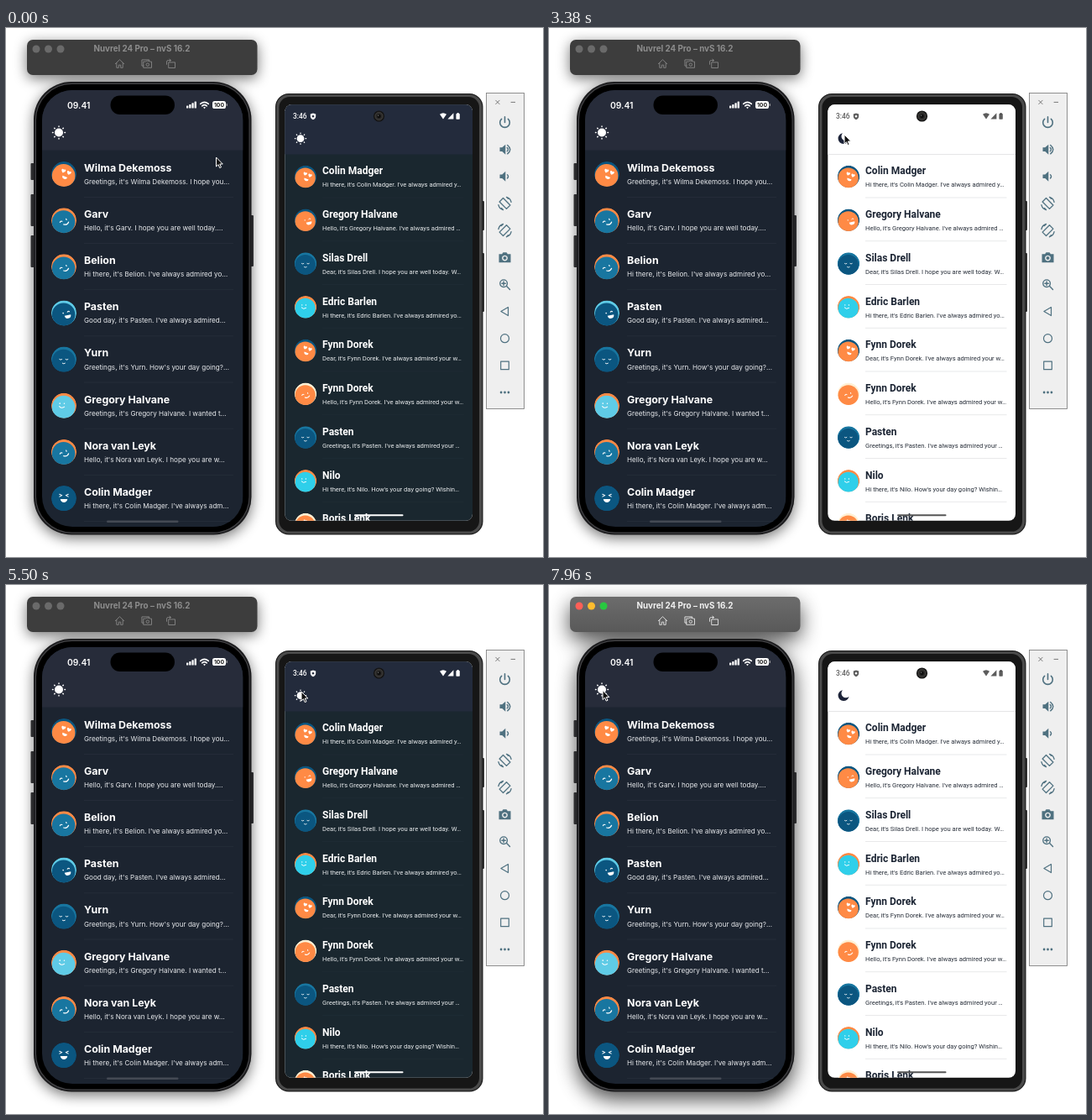
Write an HTML page that moves like this. It is 640 px wide and 630 px high and loops after 8000 ms.

```html
<!DOCTYPE html>
<html lang="en">
<head>
<meta charset="utf-8">
<title>Theme switch</title>
<style>
html, body { margin: 0; width: 100%; height: 100%; overflow: hidden; background: #fff; }
svg { display: block; width: 640px; height: 630px; }
.ios { font-family: Inter, sans-serif; }
.droid { font-family: Roboto, sans-serif; }
</style>
</head>
<body>
<svg id="stage" viewBox="0 0 640 630"></svg>
<script>
const LOOP = 8000;
const ORANGE = "#ff8a45", NAVY = "#0b5680", BLUE = "#1876a0", CYAN = "#5fcbe6", AQUA = "#2fcfea", CREAM = "#fff0d4";

// name, greeting, rest, rim, face, mood, tilt
const iosRows = [
  ["Wilma Dekemoss", "Greetings", "I hope you…", NAVY, ORANGE, "heart", 20],
  ["Garv", "Hello", "I hope you are well today.…", ORANGE, BLUE, "wink", -25],
  ["Belion", "Hi there", "I've always admired yo…", ORANGE, BLUE, "wink", -25],
  ["Pasten", "Good day", "I've always admired…", CYAN, NAVY, "open", -12],
  ["Yurn", "Greetings", "How's your day going?…", BLUE, NAVY, "sleep", 0],
  ["Gregory Halvane", "Greetings", "I wanted t…", ORANGE, CYAN, "smile", 10],
  ["Nora van Leyk", "Hello", "I hope you are w…", ORANGE, BLUE, "wink", -25],
  ["Colin Madger", "Hi there", "I've always adm…", NAVY, NAVY, "laugh", 0]
];
const droidRows = [
  ["Colin Madger", "Hi there", "I've always admired y…", NAVY, ORANGE, "heart", 20],
  ["Gregory Halvane", "Hello", "I've always admired …", NAVY, ORANGE, "open", -12],
  ["Silas Drell", "Dear", "I hope you are well today. W…", BLUE, NAVY, "sleep", 0],
  ["Edric Barlen", "Hi there", "I've always admired yo…", ORANGE, AQUA, "smile", 10],
  ["Fynn Dorek", "Dear", "I've always admired your w…", NAVY, ORANGE, "heart", 20],
  ["Fynn Dorek", "Hello", "I've always admired your w…", CREAM, ORANGE, "wink", -20],
  ["Pasten", "Greetings", "I've always admired your …", BLUE, NAVY, "sleep", 0],
  ["Nilo", "Hi there", "How's your day going? Wishin…", ORANGE, AQUA, "smile", 10],
  ["Boris Lenk", "Hello", "I hope you are well today.…", CREAM, ORANGE, "heart", 20]
];

const rect = (x, y, w, h, r, fill, more = "") =>
  `<rect x="${x}" y="${y}" width="${w}" height="${h}" rx="${r}" fill="${fill}" ${more}/>`;
const dot = (x, y, r, fill, more = "") => `<circle cx="${x}" cy="${y}" r="${r}" fill="${fill}" ${more}/>`;
const shape = (d, fill, more = "") => `<path d="${d}" fill="${fill}" ${more}/>`;
const line = (d, color, w = 1.2, more = "") =>
  `<path d="${d}" fill="none" stroke="${color}" stroke-width="${w}" stroke-linecap="round" stroke-linejoin="round" ${more}/>`;
const text = (x, y, size, weight, fill, s, more = "") =>
  `<text x="${x}" y="${y}" font-size="${size}" font-weight="${weight}" fill="${fill}" ${more}>${s}</text>`;
const at = (x, y, inner, extra = "") => `<g transform="translate(${x} ${y}) ${extra}">${inner}</g>`;

const heart = (x, y) => at(x, y, shape("M0,2.8C-5,-.6 -2.6,-3.9 0,-1.6C2.6,-3.9 5,-.6 0,2.8z", "#fff"));
const moods = {
  heart: heart(-2, -4) + heart(6, -4) + shape("M-1,2.6H6A3.5,3.5 0 0 1 -1,2.6z", "#fff"),
  wink: line("M-6,.2q1.6,-1.7 3.2,0M3.6,-.6v1.4", "#fff", 1.3) + line("M-2.6,4.8Q1,8.2 4.8,4.8", "#fff", 1.4),
  open: dot(-1, 0, .9, "#fff") + line("M5,-.4q1.4,-1.3 2.8,0", "#fff") + shape("M0,4H8.8A4.4,4.4 0 0 1 0,4z", "#fff"),
  sleep: line("M-6,0q1.6,1.5 3.2,0M2.4,0q1.6,1.5 3.2,0M-2,5.4q1.8,1.5 3.6,0", "#fff", 1.1),
  smile: dot(-6, -2, .9, "#fff") + dot(0, -3, .9, "#fff") + line("M-6,2Q-3,5.2 1,1.4", "#fff", 1.2),
  laugh: line("M-6,-5.6l3.4,1.7l-3.4,1.7M6,-5.6l-3.4,1.7l3.4,1.7", "#fff", 1.2) + shape("M-4.8,1H4.8A4.8,4.8 0 0 1 -4.8,1z", "#fff")
};

function avatar(x, y, scale, [, , , rim, face, mood, tilt]) {
  return at(x, y, `<g clip-path="url(#disc)">${dot(0, 0, 15, rim)}${dot(-.4, 1.9, 13.8, face)}</g>` +
    `<g transform="rotate(${tilt}) scale(.87)">${moods[mood]}</g>`, `scale(${scale})`);
}

function list(rows, o) {
  return rows.map((row, i) => {
    const y = o.top + i * o.step;
    const body = `${row[1]}, it's ${row[0]}. ${row[2]}`;
    return avatar(o.ax, y + o.ay, o.ar / 15, row) +
      text(o.x, y + o.base, o.big, 700, o.name, row[0]) +
      text(o.x, y + o.sub, o.small, 400, o.body, body) +
      rect(o.x, y + o.rule, o.w, .8, 0, o.line);
  }).join("");
}

function sun(x, y, r) {
  let rays = "";
  for (let i = 0; i < 8; i++) {
    const a = i * Math.PI / 4, c = Math.cos(a), s = Math.sin(a);
    rays += `M${c * r * 1.38},${s * r * 1.38}L${c * r * 1.5},${s * r * 1.5}`;
  }
  return at(x, y, dot(0, 0, r, "#fff") + line(rays, "#fff", r * .3));
}
const moon = (x, y) => at(x, y, shape("M-1,-6.5A6.5,6.5 0 1 0 6.5,1A5.3,5.3 0 0 1 -1,-6.5z", "#1c2338"));
const wifi = (x, y, s, c) => at(x, y,
  line("M-4.8,-2.2Q0,-6.4 4.8,-2.2M-2.8,.2Q0,-2.2 2.8,.2", c, 1.6) + shape("M-1.5,2Q0,.8 1.5,2L0,3.6z", c), `scale(${s})`);

function titleBar(active) {
  const ink = active ? "#f2f2f2" : "#8d8d8d", icon = active ? "#e6e6e6" : "#868686";
  const lights = active ? ["#ff5f57", "#febc2e", "#28c840"] : ["#6a6a6a", "#6a6a6a", "#6a6a6a"];
  const fill = active ? "url(#bar)" : "#3d3d3d";
  return rect(25, 14, 274.5, 42, 7, fill) +
    lights.map((c, i) => dot(36 + i * 14.5, 25, 4.5, c)).join("") +
    text(162, 28.3, 9.8, 700, ink, "Nuvrel 24 Pro – nvS 16.2", 'text-anchor="middle"') +
    at(135.5, 42.5, line("M-5.2,.2L0,-4.8L5.2,.2M-3.7,-1V4.8H-1.2V1.6H1.2V4.8H3.7V-1", icon, .9)) +
    at(167.5, 42.5, line("M-3.4,2.6H-5.6V-4.6H3.2V-2.8M-3.4,-2.4H-1L0,-3.4H3L4,-2.4H6V4.8H-3.4z", icon, .9) +
      dot(1.3, 1.1, 1.7, "none", `stroke="${icon}" stroke-width=".9"`)) +
    at(196.5, 42.5, line("M-2.4,-1.6H5V5H-2.4zM-5,.8V-2.4Q-5,-4 -3,-4H0M-1.6,-5.4L0,-4L-1.6,-2.6", icon, .9));
}

function iosPhone() {
  const keys = [[29.5, 161, 20], [29.5, 198, 38], [29.5, 247, 38], [291, 223, 61]]
    .map(([x, y, h]) => rect(x, y, 4, h, 1, "#2b2b2d")).join("");
  const bars = [3, 4.6, 6.4, 8.2].map((h, i) => rect(215 + i * 3.2, 95.6 - h, 2.3, h, .6, "#fff")).join("");
  return keys + rect(33, 64, 259.5, 539.5, 45, "#1b1b1d") +
    rect(35.4, 66.4, 254.7, 534.7, 43, "#000", 'stroke="#434346" stroke-width="1.2"') +
    `<g clip-path="url(#iosScreen)">` + rect(43, 74, 239.5, 520, 0, "#1c2430") + rect(43, 74, 239.5, 71.5, 0, "#272c3a") +
    list(iosRows, { top: 147, step: 55.15, ax: 69, ay: 27, ar: 15, x: 93, w: 178, base: 23.8, sub: 39,
      rule: 54, big: 12.4, small: 8.15, name: "#fff", body: "#e9ebee", line: "#262e3a" }) + "</g>" +
    rect(124.5, 80.5, 76.5, 22.5, 11.2, "#000") +
    text(73, 95.5, 10.3, 600, "#fff", "09.41") + bars + wifi(236.5, 92.6, 1, "#fff") +
    rect(246, 87, 16, 9, 2.6, "#fff") + rect(262.6, 90, 1.2, 3, .6, "#aaa") +
    text(254, 94.1, 6.8, 700, "#222", "100", 'text-anchor="middle"') +
    sun(63, 124.5, 5) + rect(120, 586.6, 85.5, 2.4, 1.2, "#444a54");
}

function droidScreen(dark) {
  const c = dark ? { bg: "#1a272f", head: "#232b3c", name: "#fff", body: "#e9ecee", line: "#1f2c35" }
                 : { bg: "#fff", head: "#fff", name: "#1b2433", body: "#262d38", line: "#e2e3e5" };
  return rect(332, 91, 224.5, 496, 0, c.bg) + rect(332, 91, 224.5, 59.5, 0, c.head) +
    (dark ? sun(351, 131.7, 4.4) : rect(332, 150, 224.5, .9, 0, c.line) + moon(351, 131.7)) +
    list(droidRows, { top: 151, step: 51.75, ax: 357, ay: 26, ar: 13.2, x: 377, w: 168.5, base: 23.4, sub: 38.3,
      rule: 50.6, big: 12, small: 7.6, ...c });
}

function droidPhone() {
  return rect(566, 206, 4, 35, 1, "#333") + rect(566, 268, 4, 70, 1, "#333") +
    rect(321, 78, 247.5, 525.5, 16, "#1c1c1c") + rect(322.2, 79.2, 245.1, 523.1, 15, "#4a4a4a") +
    rect(325.4, 82, 238.6, 517.6, 12.5, "#161616") +
    `<g clip-path="url(#droidScreen)">${droidScreen(false)}<g clip-path="url(#wipe)">${droidScreen(true)}</g>` +
    `<g id="status">` + text(342, 108.2, 8.4, 500, "currentColor", "3:46") +
    shape("M366,101.4L369.2,102.6V105Q369.2,108 366,109.2Q362.8,108 362.8,105V102.6zM366,103.6L364.4,105.2L366,106.8L367.6,105.2z",
      "currentColor", 'fill-rule="evenodd"') +
    shape("M517,102.8Q521,99.8 525,102.8L521,108.6zM533.4,101.2V108.6H526.4z", "currentColor") +
    rect(536.4, 102, 4.4, 6.8, .8, "currentColor") + rect(537.6, 101, 2, 1.4, 0, "currentColor") + "</g>" +
    `<rect id="pill" x="415" y="579.3" width="58.5" height="2" rx="1"/></g>` +
    dot(444.5, 105, 6.6, "#151515") + dot(444.5, 105, 4.6, "#2b2a29", 'stroke="#4a4744" stroke-width=".8"') +
    dot(444.5, 105, 2.3, "#0d0d0d") + dot(443.7, 104.3, .7, "#777");
}

function toolbar() {
  const c = "#4f7180";
  const speaker = shape("M-6,-2.3H-3.2L.8,-6V6L-3.2,2.3H-6z", c);
  const turn = line("M-6.4,-2L-2,-6.4L6.4,2L2,6.4zM2,-7.6Q6.6,-6.4 7.6,-1.6M-2,7.6Q-6.6,6.4 -7.6,1.6M2,-7.6L4,-5.6M-2,7.6L-4,5.6", c, 1.3);
  const icons = [
    line("M-3.9,-4.2A5.8,5.8 0 1 0 3.9,-4.2M0,-6.6V0", c, 1.6),
    speaker + line("M2.8,-2.2Q5,0 2.8,2.2M3.2,-5.2Q9.4,0 3.2,5.2", c, 1.4),
    speaker + line("M3,-2.2Q5.2,0 3,2.2", c, 1.3),
    turn,
    `<g transform="scale(-1 1)">${turn}</g>`,
    shape("M-7,-4H-3.4L-2,-6H2L3.4,-4H7V6H-7zM0,-2.6A3.4,3.4 0 1 0 .01,-2.6z", c, 'fill-rule="evenodd"') + dot(0, .8, 2, c),
    line("M1.9,1.9L6,6M-3.6,-1.2H.8M-1.4,-3.4V1", c, 1.4) + dot(-1.4, -1.2, 4.3, "none", `stroke="${c}" stroke-width="1.4"`),
    line("M4,-5V5L-4.6,0z", c, 1.2),
    dot(0, 0, 5, "none", `stroke="${c}" stroke-width="1.2"`),
    line("M-4.8,-4.8H4.8V4.8H-4.8z", c, 1.2),
    dot(-4.4, 0, 1.4, c) + dot(0, 0, 1.4, c) + dot(4.4, 0, 1.4, c)
  ];
  return rect(572.5, 77.5, 45, 376, 0, "#efefef", 'stroke="#858585" stroke-width=".9"') +
    line("M583.7,86.2l4.4,4.4m0,-4.4l-4.4,4.4M602,88.4h4.6", "#6b6b6b", .9) +
    icons.map((s, i) => at(594.5, 112.5 + i * 32.15, s)).join("");
}

const shadow = (blur, dy, alpha, id) => `<g id="${id}" filter="url(#${blur})" opacity="${alpha}">` +
  rect(33, 64 + dy, 259.5, 539.5, 45, "#000") + rect(25, 14 + dy, 274.5, 42, 7, "#000") + "</g>";
const blur = (id, s) => `<filter id="${id}" x="-30%" y="-20%" width="160%" height="140%"><feGaussianBlur stdDeviation="${s}"/></filter>`;

const stage = document.getElementById("stage");
stage.innerHTML = "<defs>" + blur("near", 8) + blur("far", 12) +
  `<linearGradient id="bar" x2="0" y2="1"><stop stop-color="#6c6c6c"/><stop offset="1" stop-color="#595959"/></linearGradient>
  <clipPath id="disc"><circle r="15"/></clipPath>
  <clipPath id="iosScreen"><rect x="43" y="74" width="239.5" height="520" rx="36"/></clipPath>
  <clipPath id="droidScreen"><rect x="332.3" y="91.3" width="223.7" height="495.5" rx="8"/></clipPath>
  <clipPath id="wipe"><rect id="edge" x="332" y="90" width="224" height="500"/></clipPath></defs>` +
  rect(0, 0, 640, 630, 0, "#fff") +
  shadow("near", 4, .55, "calm") + shadow("far", 9, .7, "deep") +
  `<g class="ios"><g id="idle">${titleBar(false)}</g><g id="active">${titleBar(true)}</g>${iosPhone()}</g>` +
  `<g class="droid">${droidPhone()}</g>` + toolbar() +
  `<g id="cursor">${shape("M0,0V11L2.5,8.7L4.2,12.6L6,11.8L4.3,8H7.8z", "#111", 'stroke="#fff" stroke-width="1" stroke-linejoin="round"')}</g>`;

const $ = id => document.getElementById(id);
const span = (t, from, len) => Math.min(1, Math.max(0, (t - from) / len));
const inOut = u => u < .5 ? 2 * u * u : 1 - 2 * (1 - u) ** 2;
const out = u => 1 - (1 - u) ** 2;
const mix = (a, b, u) => a + (b - a) * u;

const TO_LIGHT = 2116, TO_DARK = 3976, TO_LIGHT_AGAIN = 5625, SWEEP = 800, FOCUS = 6740;

function pointer(t) {
  if (t < 6080) {
    const u = inOut(span(t, 720, 680));
    return [mix(250.5, 352, u), mix(154, 127, u)];
  }
  if (t < 7000) {
    const u = out(span(t, 6080, 560));
    return [mix(352, 169, u), mix(127, 113, u)];
  }
  const u = inOut(span(t, 7000, 740));
  return [mix(169, 64, u), mix(113, 125.5, u) + 12 * Math.sin(Math.PI * u)];
}

function draw(t) {
  const sweep = from => inOut(span(t, from, SWEEP));
  const [a, b] = t < TO_DARK ? [sweep(TO_LIGHT), 1] : [sweep(TO_LIGHT_AGAIN), sweep(TO_DARK)];
  $("edge").setAttribute("x", 332 + a * 224);
  $("edge").setAttribute("width", Math.max(0, b - a) * 224);

  const light = (t >= TO_LIGHT + 20 && t < TO_DARK + 20) || t >= TO_LIGHT_AGAIN + 20;
  $("status").style.color = light ? "rgba(0,0,0,.64)" : "#fff";

  const shade = span(t, 2920, 280) - span(t, 4840, 200) + span(t, 6480, 360);
  const g = Math.round(mix(255, 85, shade));
  $("pill").setAttribute("fill", `rgb(${g},${g},${g})`);

  const focused = t >= FOCUS;
  $("active").style.display = $("deep").style.display = focused ? "" : "none";
  $("idle").style.display = $("calm").style.display = focused ? "none" : "";

  const [x, y] = pointer(t);
  $("cursor").setAttribute("transform", `translate(${x} ${y})`);
}

const start = performance.now();
function tick() {
  draw((performance.now() - start) % LOOP);
  requestAnimationFrame(tick);
}
draw(0);
requestAnimationFrame(tick);
</script>
</body>
</html>
```
